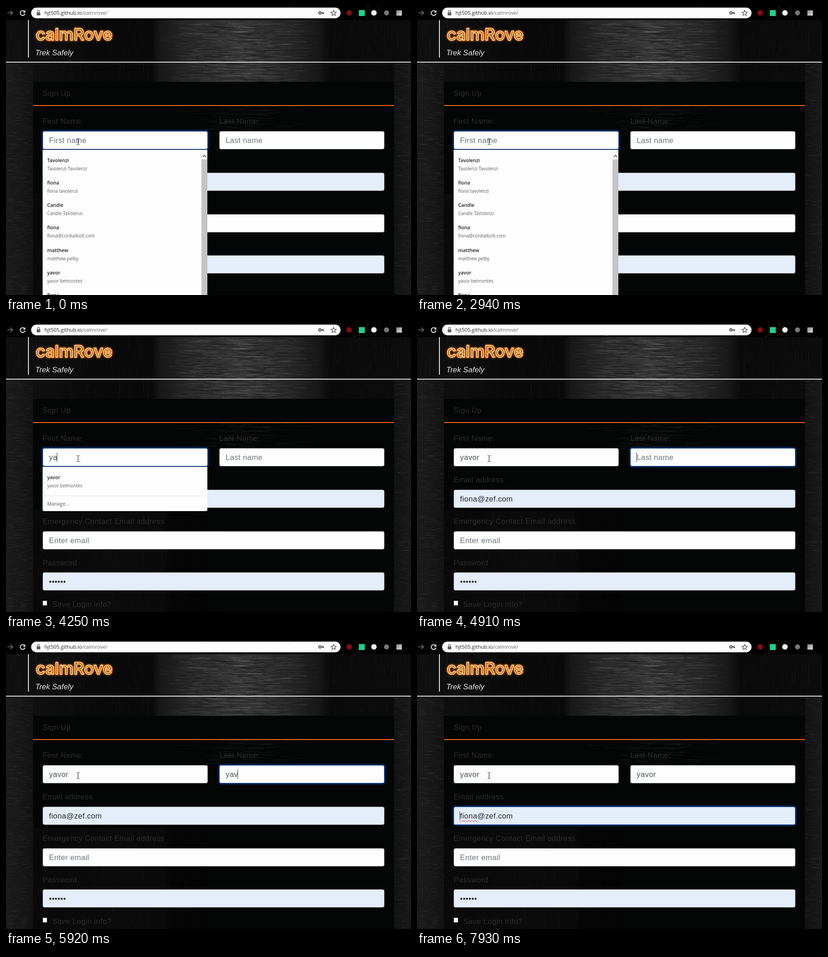
Animation of 885x633 px, one loop 8000 ms. Source, as an HTML page with a canvas:

```html
<!DOCTYPE html>
<html lang="en">
<head>
<meta charset="utf-8">
<title>Sign Up</title>
<style>
html, body { margin: 0; width: 100%; height: 100%; overflow: hidden; background: #000; }
#stage { position: absolute; left: 0; top: 0; width: 885px; height: 633px; overflow: hidden;
  font: 16.5px/20px "Liberation Sans", Arial, sans-serif; letter-spacing: .4px; white-space: pre; }
#stage > * { position: absolute; box-sizing: border-box; }
#metal, #chrome { left: 0; top: 0; }
.url { left: 84px; top: 5px; font: 11.2px/20px "Open Sans", sans-serif; letter-spacing: 0; color: #202124; }
.url span { color: #5f6368; }
.tag { left: 64px; top: 92px; color: #e8e8e8; font-style: italic; letter-spacing: .1px; }
.label { color: #2b2d30; }
.field { height: 40px; padding: 0 13px; line-height: 38px; color: #495057; background: #fdfdfd;
  border: 1px solid #8b8f95; border-radius: 4px; }
.auto { background: #e5ecfa; color: #24272b; }
.thin { border-color: #2a5594; box-shadow: 0 0 0 1px #071c3c; }
.on { border-color: #2a5ba8; box-shadow: 0 0 0 3px #04204a; }
.hint { color: #6c757d; }
.caret { position: absolute; top: 9px; width: 1px; height: 20px; margin-left: -1px; background: #30363b; }
.misspelt { text-decoration: underline wavy #e0252b 1px; text-underline-offset: 3px; }
.sel { background: #4f84f0; color: #fff; padding-bottom: 1px; }
.popup { width: 360px; top: 315px; background: #fdfdfd; overflow: hidden;
  font-family: "Open Sans", sans-serif; letter-spacing: 0; }
.popup > * { position: absolute; left: 10px; line-height: 16px; }
.popup b { font-size: 10.6px; font-weight: 600; color: #1f2023; }
.popup span { font-size: 9.9px; color: #5b5e62; }
.popup em { top: 73px; font-size: 10.7px; font-style: normal; color: #5b5e62; }
.popup hr { left: 0; top: 63px; width: 100%; height: 1px; margin: 0; border: 0; background: #e6e6e6; }
.small { height: 97px; border-radius: 0 0 3px 3px; }
.tick { left: 80px; top: 608px; width: 10px; height: 11px; background: #fff; border: 1px solid #777; }
[hidden] { display: none; }
</style>
</head>
<body>
<div id="stage">
  <canvas id="metal" width="885" height="633"></canvas>

  <svg id="chrome" width="885" height="126" viewBox="0 0 885 126" fill="none">
    <defs>
      <filter id="glow" x="-10%" y="-40%" width="120%" height="180%"><feGaussianBlur stdDeviation="1.800"/></filter>
      <linearGradient id="fade" x2="1" y2="1"><stop stop-color="#888"/><stop offset="1" stop-color="#ddd"/></linearGradient>
    </defs>
    <path d="M3 15H14M9.500 10L14.500 15L9.500 20" stroke="#777" stroke-width="1.600"/>
    <path d="M40.500 12A5.300 5.300 0 1 0 41.600 16.500" stroke="#eee" stroke-width="1.900"/>
    <path d="M42.300 9V14.500H36.800Z" fill="#eee"/>
    <rect x="55" y="3.500" width="676" height="23.500" rx="11.700" fill="#fdfdfd"/>
    <rect x="67" y="14" width="8" height="6.500" rx="1" fill="#5f6368"/>
    <path d="M68.700 14V12A2.300 2.300 0 0 1 73.300 12V14" stroke="#5f6368" stroke-width="1.300"/>
    <circle cx="686" cy="15" r="2.600" stroke="#4a4d51" stroke-width="2"/>
    <path d="M689 15H695M693 15V18" stroke="#4a4d51" stroke-width="2.200"/>
    <path d="M716 9.500L717.600 13.500L721.800 13.800L718.600 16.500L719.600 20.600L716 18.400L712.400 20.600L713.400 16.500L710.200 13.800L714.400 13.500Z" stroke="#55585c" stroke-width="1.300"/>
    <circle cx="750" cy="15" r="6" fill="#850d12"/>
    <rect x="771" y="9" width="13" height="13" fill="#1fd08c"/>
    <circle cx="804" cy="15" r="6" fill="#f2f2f2"/>
    <circle cx="831.500" cy="15" r="5.500" fill="#777"/>
    <rect x="853" y="9.500" width="12" height="11.500" fill="url(#fade)"/>
    <path d="M49 31V113M0 123H885" stroke="#e0e0e0" stroke-width="2"/>
    <g font-family="Inter, sans-serif" font-size="36" font-weight="500" letter-spacing="0" stroke-linejoin="round">
      <text x="65" y="75" stroke="#e8720c" stroke-width="4" filter="url(#glow)">calmRove</text>
      <text x="65" y="75" fill="#b9610f" stroke="#ffe0b0" stroke-width="1.500">calmRove</text>
    </g>
  </svg>

  <div class="url">hjt505.github.io<span>/calmrove/</span></div>
  <div class="tag">Trek Safely</div>

  <div class="label" style="left:80px;top:181px">Sign Up</div>
  <div class="label" style="left:80px;top:242px">First Name:</div>
  <div class="label" style="left:466px;top:242px">Last Name:</div>
  <div class="label" style="left:80px;top:333px">Email address</div>
  <div class="label" style="left:80px;top:424px">Emergency Contact Email address</div>
  <div class="label" style="left:80px;top:515px">Password</div>
  <div class="label" style="left:101px;top:606px">Save Login info?</div>
  <div class="tick"></div>

  <div id="first" class="field" style="left:80px;top:274px;width:361px"><span></span><i class="caret"></i><span class="hint">First name</span></div>
  <div id="last" class="field" style="left:466px;top:274px;width:361px"><span></span><i class="caret"></i><span class="hint">Last name</span></div>
  <div id="mail" class="field auto" style="left:80px;top:365px;width:747px"><i class="caret"></i><span id="address"><span id="user">fiona</span>@zef.com</span></div>
  <div class="field" style="left:80px;top:456px;width:747px"><span class="hint">Enter email</span></div>
  <div class="field auto" style="left:80px;top:546px;width:747px">••••••</div>

  <div id="all" class="popup" style="left:80px;height:320px">
    <svg style="left:347px;top:0" width="13" height="320">
      <rect width="13" height="320" fill="#f8f8f8"/>
      <rect y="21" width="13" height="300" fill="#c4c4c4"/>
      <path d="M3 16L6.500 12L10 16" fill="none" stroke="#505050" stroke-width="1.500"/>
    </svg>
  </div>
  <div id="one" class="popup small" style="left:80px"></div>
  <div id="two" class="popup small" style="left:466px"></div>

  <svg style="left:152px;top:289px" width="11" height="16" fill="none" stroke="#111">
    <path d="M2.500 1.500H4.500L5.500 2.500L6.500 1.500H8.500M5.500 2.500V13.500M2.500 14.500H4.500L5.500 13.500L6.500 14.500H8.500"/>
  </svg>
</div>

<script>
const $ = id => document.getElementById(id);

// Brushed metal
const g = $('metal').getContext('2d');
let seed = 7;
const rnd = () => (seed = (seed * 16807) % 2147483647) / 2147483647;
const box = (x, y, w, h, fill) => { g.fillStyle = fill; g.fillRect(x, y, w, h); };

function sheen(x, y, w, h, stops) {
  const grad = g.createLinearGradient(x, 0, x + w, 0);
  stops.forEach(([p, v]) => grad.addColorStop(p, `rgb(${v},${v},${v})`));
  box(x, y, w, h, grad);
}

// Scratches inside a box; dir 'h' or 'v', bell gathers them round the middle
function brush(x, y, w, h, n, len, alpha, dir, bell) {
  g.save();
  g.beginPath(); g.rect(x, y, w, h); g.clip();
  for (let i = 0; i < n; i++) {
    const l = len * (.3 + rnd());
    const u = bell ? (rnd() + rnd() + rnd()) / 3 : rnd();
    const v = rnd() < .5 ? 150 : 0;
    const px = x + u * w, py = Math.floor(y + rnd() * h);
    const ink = `rgba(${v},${v},${v},${alpha * rnd()})`;
    if (dir === 'h') box(px - l / 2, py, l, 1, ink);
    else box(Math.floor(px), py - l / 2, 1, l, ink);
  }
  g.restore();
}

box(0, 0, 885, 633, '#000');
for (let i = 0; i < 60; i++) {
  const v = 50 + rnd() * 130 | 0;
  box(rnd() * 885 | 0, rnd() * 30 | 0, 1, 1, `rgb(${v},${v},${v + 20})`);
}
sheen(0, 31, 885, 135, [[0, 15], [.1, 15], [.22, 9], [.36, 9], [.38, 24], [.46, 40], [.58, 48], [.7, 38], [.77, 24], [.8, 10], [1, 12]]);
brush(0, 31, 330, 135, 400, 30, .06, 'v');
brush(700, 31, 185, 135, 250, 30, .06, 'v');
brush(325, 31, 375, 135, 2600, 34, .17, 'h', true);
sheen(0, 125, 59, 508, [[0, 27], [.6, 23], [1, 18]]);
sheen(848, 125, 37, 508, [[0, 18], [1, 25]]);
brush(0, 125, 59, 508, 1500, 12, .1, 'h');
brush(848, 125, 37, 508, 900, 12, .1, 'h');
box(59, 166, 789, 467, '#040605');
brush(350, 219, 340, 60, 260, 40, .1, 'h', true);
sheen(59, 412, 385, 221, [[0, 9], [.45, 11], [.74, 10], [.78, 5], [1, 4]]);
brush(59, 412, 291, 221, 500, 24, .06, 'v');
box(59, 217, 789, 2, '#f0681a');

// Autofill lists
function entry(id, title, sub, i = 0) {
  const top = 14.5 + i * 49.25;
  $(id).insertAdjacentHTML('beforeend',
    `<b style="top:${top}px">${title}</b><span style="top:${top + 18}px">${sub}</span>`);
}
[['Tavolenzi', 'Tavolenzi Tavolenzi'], ['fiona', 'fiona tavolenzi'], ['Candle', 'Candle TaVolenzi'],
 ['fiona', 'fiona@cordialbolt.com'], ['matthew', 'matthew pelby'], ['yavor', 'yavor belmontes'],
 ['fiona', 'fiona tavolenzi']].forEach(([a, b], i) => entry('all', a, b, i));
entry('one', 'yavor', 'yavor belmontes');
entry('two', 'yom', 'diane yom');
for (const id of ['one', 'two']) $(id).insertAdjacentHTML('beforeend', '<hr><em>Manage...</em>');

// Each track: [start ms, value] pairs
const LOOP = 8000, NAME = 'yavor';
const track = {
  firstLen: [[0, 0], [3610, 1], [4250, 2], [4370, 3], [4490, 4], [4650, 5]],
  lastLen: [[0, 0], [5650, 2], [5920, 3], [6070, 4], [6190, 5]],
  firstCaret: [[0, 0], [370, 1], [900, 0], [1460, 1], [1980, 0], [2380, 1], [2940, 0], [3460, 1], [4770, 0]],
  lastCaret: [[0, 0], [4770, 1], [5340, 0], [5650, 1], [6750, 0]],
  mailCaret: [[0, 0], [7930, 1]],
  firstRing: [[0, 'on'], [4910, '']],
  lastRing: [[0, ''], [4910, 'on'], [6750, 'thin'], [6870, '']],
  mailRing: [[0, ''], [6750, 'thin'], [6870, 'on']],
  popup: [[0, 'all'], [3610, 'one'], [4770, ''], [5650, 'two'], [5800, '']],
  selected: [[0, 0], [6750, 1], [7930, 0]]
};
const at = (key, t) => track[key].filter(k => k[0] <= t).pop()[1];

function ring(id, t) {
  const state = at(id + 'Ring', t), list = $(id).classList;
  list.toggle('on', state === 'on');
  list.toggle('thin', state === 'thin');
  $(id).querySelector('.caret').hidden = !at(id + 'Caret', t);
}

function typed(id, t) {
  const [text, , hint] = $(id).children, n = at(id + 'Len', t);
  text.textContent = NAME.slice(0, n);
  hint.hidden = n > 0;
}

function draw(t) {
  ['first', 'last', 'mail'].forEach(id => ring(id, t));
  ['first', 'last'].forEach(id => typed(id, t));
  ['all', 'one', 'two'].forEach(id => $(id).hidden = at('popup', t) !== id);
  $('address').classList.toggle('sel', !!at('selected', t));
  $('user').classList.toggle('misspelt', t >= 6750);
}

const start = performance.now();
function tick() {
  draw((performance.now() - start) % LOOP);
  requestAnimationFrame(tick);
}
tick();
</script>
</body>
</html>
```
